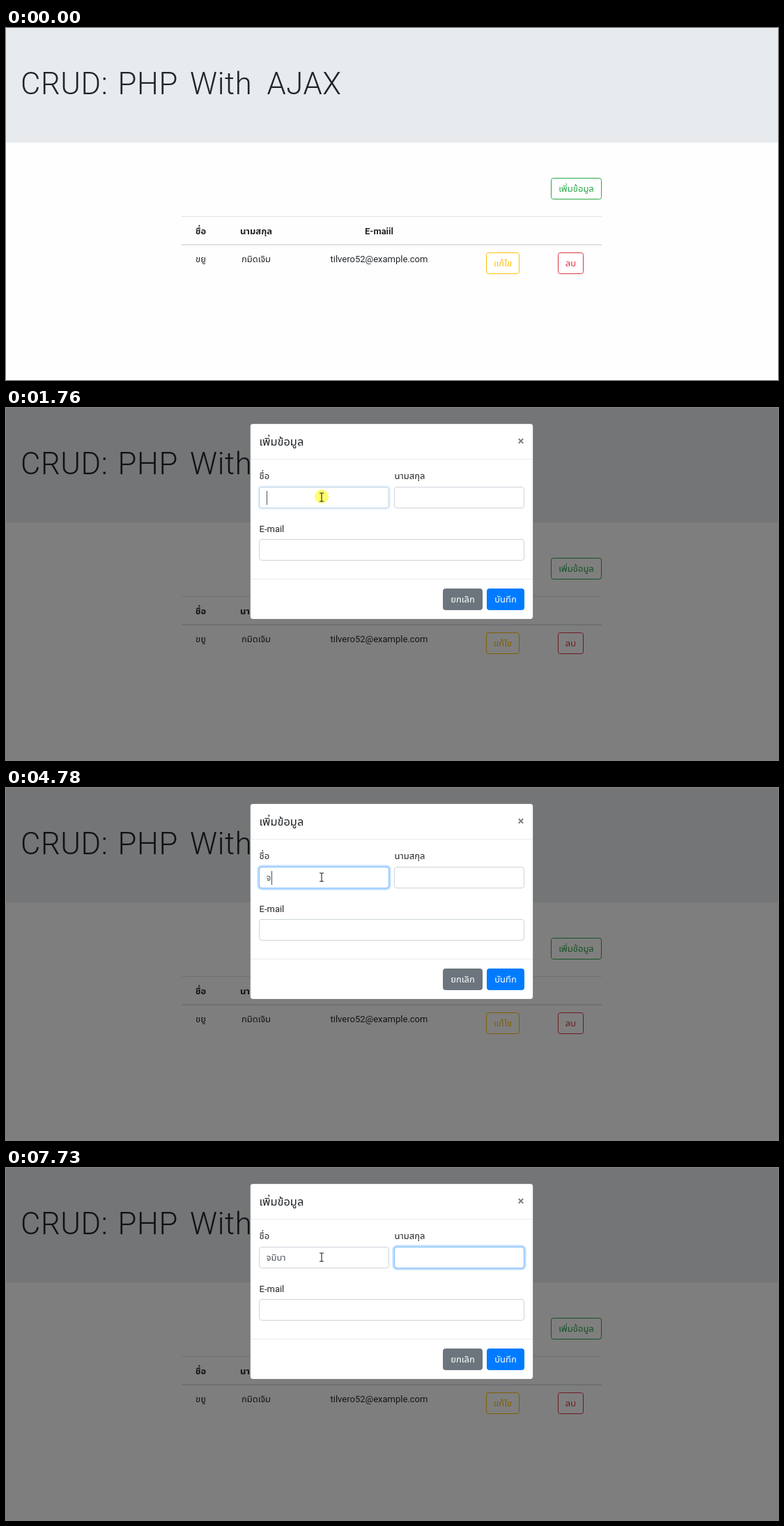
These frames come from a looping animation (1108x505 px, 8 s). An HTML page:

```html
<!DOCTYPE html>
<html lang="th">
<head>
<meta charset="utf-8">
<title>CRUD: PHP With AJAX</title>
<style>
  html, body { margin: 0; width: 100%; height: 100%; overflow: hidden; background: #fff; }
  svg { display: block; width: 100vw; height: 100vh; }
  text { font: 400 13px Roboto, "Noto Sans Thai", "Noto Sans", sans-serif; fill: #212529; white-space: pre; }
</style>
</head>
<body>
<svg id="stage" viewBox="0 0 1108 505" xmlns="http://www.w3.org/2000/svg"></svg>
<script>
const LOOP = 8000;
const stage = document.getElementById('stage');

function el(parent, tag, attrs = {}, content) {
  const node = document.createElementNS('http://www.w3.org/2000/svg', tag);
  for (const key in attrs) node.setAttribute(key, attrs[key]);
  if (content) node.textContent = content;
  return parent.appendChild(node);
}
const group = (parent, attrs) => el(parent, 'g', attrs);
const rect = (parent, x, y, width, height, fill, attrs) =>
  el(parent, 'rect', { x, y, width, height, fill, ...attrs });
const label = (parent, x, y, str, style = '', anchor = 'start') =>
  el(parent, 'text', { x, y, style, 'text-anchor': anchor }, str);

function button(parent, x, y, w, str, color, solid) {
  const box = rect(parent, x + .5, y + .5, w - 1, 30, solid ? color : '#fff', { rx: 3, stroke: color });
  const text = label(parent, x + w / 2, y + 20, str,
    `fill:${solid ? '#fff' : color};font-weight:${solid ? 500 : 400}`, 'middle');
  return { box, text };
}

function field(parent, x, y, w) {
  const glow = rect(parent, x - 1, y - 1, w + 2, 33, 'none',
    { rx: 5, stroke: '#007bff', 'stroke-opacity': .25, 'stroke-width': 3 });
  rect(parent, x + .5, y + .5, w - 1, 30, '#fff', { rx: 3.5, stroke: '#ced4da' });
  const edge = rect(parent, x + .5, y + .5, w - 1, 30, 'none', { rx: 3.5, stroke: '#80bdff' });
  return focus => [glow, edge].forEach(n => n.setAttribute('opacity', focus));
}

// Page
rect(stage, 0, 0, 1108, 505, '#fefefe');
rect(stage, 0, 0, 1108, 164.5, '#e7ebee');
[['CRUD:', 21], ['PHP', 160.5], ['With', 264], ['AJAX', 374.5]].forEach(([word, x]) =>
  label(stage, x, 95, word, 'font-size:43.6px;font-weight:300;letter-spacing:.6px'));

const addButton = button(stage, 782, 215, 73, 'เพิ่มข้อมูล', '#28a745');
rect(stage, 252, 270, 603, 1, '#dee2e6');
rect(stage, 252, 310, 603, 2, '#dee2e6');
const columns = [279.5, 359, 535.5];
['ชื่อ', 'นามสกุล', 'E-maiil'].forEach((s, i) =>
  label(stage, columns[i], 296, s, 'font-weight:700', 'middle'));
['ขยู', 'กมิดเจิม', 'tilvero52@example.com'].forEach((s, i) =>
  label(stage, columns[i], 336, s, '', 'middle'));
button(stage, 689, 322, 48, 'แก้ไข', '#ffc107');
button(stage, 792, 322, 37, 'ลบ', '#dc3545');

// Modal
const modal = group(stage);
rect(modal, 0, 0, 1108, 505, '#000', { opacity: .5 });
rect(modal, 350.5, 22.5, 406, 280.5, '#fff', { rx: 4, stroke: '#000', 'stroke-opacity': .25 });
rect(modal, 351, 73, 405, 1, '#e9ecef');
rect(modal, 351, 245, 405, 1, '#e9ecef');
label(modal, 363.5, 54, 'เพิ่มข้อมูล', 'font-size:16.4px;font-weight:500');
label(modal, 739, 53, '×', 'font-size:17px;font-weight:700;fill:#7f7f7f', 'middle');
label(modal, 363.5, 102, 'ชื่อ');
label(modal, 557.5, 102, 'นามสกุล');
label(modal, 363.5, 178, 'E-mail');
const focusFirst = field(modal, 363, 113, 187);
const focusLast = field(modal, 557, 113, 187);
field(modal, 363, 188, 381)(0);
button(modal, 627, 259, 57, 'ยกเลิก', '#6c757d', true);
button(modal, 690, 259, 54, 'บันทึก', '#007bff', true);
const typed = label(modal, 373.5, 133, '', 'fill:#495057');
const caret = rect(modal, 374, 119, 1, 20, '#495057');

// Autofill list
const list = group(modal);
rect(list, 362.5, 145, 188, 78, '#000', { rx: 2, opacity: .1 });
rect(list, 363, 145, 187, 76.5, '#fff', { stroke: '#000', 'stroke-opacity': .15 });
rect(list, 363.5, 187.5, 186, 33.5, '#f8f9fa');
rect(list, 363.5, 187, 186, 1, '#e4e6e8');
label(list, 373, 171, 'ขยู', 'font-size:10px');
label(list, 540, 171, 'ขยู กมิดเจิม', 'font-size:10px;fill:#6b6e72', 'end');
label(list, 373, 208, 'จัดการ...', 'font-size:10px;fill:#55585c');

// Pointer
const pointer = group(stage);
const click = el(pointer, 'circle', { r: 10, cy: -1, fill: '#ff0', opacity: .55 });
const outline = { fill: '#fff', stroke: '#111', 'stroke-width': 1, 'stroke-linejoin': 'round' };
const shapes = {
  arrow: el(pointer, 'path', { ...outline, d: 'M0 0V13.5L3 10.8L5 15.6L7.4 14.6L5.3 10H9.4Z' }),
  hand: el(pointer, 'path', { ...outline,
    d: 'M-.5 10V1Q.7-.8 1.9 1V6.5Q3.2 5.6 4.2 7Q5.6 6.2 6.4 7.6Q8.6 7 8.6 9.4V13L7 17.5H0L-4 11.5Q-4.2 9.3-2.5 9.8Z' }),
  beam: el(pointer, 'path', { fill: 'none', stroke: '#222', 'stroke-width': 1.1,
    d: 'M-3-6H-1Q0-6 0-5Q0-6 1-6H3M0-5V5M-3 6H-1Q0 6 0 5Q0 6 1 6H3' })
};

// [time, text]
const typing = [[0, ''], [3610, ';'], [4310, ''], [4780, 'จ'], [5620, 'จม'],
  [5940, 'จมิ'], [6420, 'จมิบ'], [6550, 'จมิบา']];
// Times at which the caret toggles, starting hidden
const blinks = [1760, 2290, 2840, 3380, 3610, 4140, 4710, 5310, 5620, 7100, 7200, 7730];

const clamp = v => Math.min(1, Math.max(0, v));
const smooth = v => v * v * (3 - 2 * v);
const ramp = (t, from, length) => clamp((t - from) / length);
const during = (t, a, b) => t >= a && t < b;
const show = (node, on) => node.setAttribute('display', on ? 'inline' : 'none');
const inside = (p, x, y, w, h) => p.x >= x && p.x <= x + w && p.y >= y && p.y <= y + h;

const START = { x: 886, y: 390 }, ADD = { x: 806, y: 232 }, NAME = { x: 453, y: 128 };

function pointerAt(t) {
  const toAdd = t < 970;
  const [a, b] = toAdd ? [START, ADD] : [ADD, NAME];
  const step = toAdd ? Math.floor((t - 70) / 70) / 5 : (Math.floor((t - 1050) / 76.25) + 1) / 9;
  const k = smooth(clamp(step));
  return { x: a.x + (b.x - a.x) * k, y: a.y + (b.y - a.y) * k };
}

function draw(t) {
  const open = t >= 970;
  const p = pointerAt(t);

  const hover = ramp(t, 280, 140) * (1 - ramp(t, 1050, 150));
  const mix = (a, b) => Math.round(a + (b - a) * hover);
  addButton.box.setAttribute('fill', `rgb(${mix(255, 40)},${mix(255, 167)},${mix(255, 69)})`);
  addButton.text.style.fill = `rgb(${mix(40, 255)},${mix(167, 255)},${mix(69, 255)})`;

  show(modal, open);
  show(list, during(t, 1830, 4310));
  const leave = ramp(t, 7180, 150);
  focusFirst(ramp(t, 1720, 150) * (1 - leave));
  focusLast(leave);

  const text = typing.filter(([at]) => t >= at).pop()[1];
  if (typed.textContent !== text) typed.textContent = text;
  show(caret, blinks.filter(at => t >= at).length % 2);
  const caretX = t >= 7200 ? 568 : 374 + (text && open ? typed.getComputedTextLength() : 0);
  caret.setAttribute('x', Math.round(caretX));

  let kind = 'arrow';
  if (!open && inside(p, 782, 215, 73, 31)) kind = 'hand';
  if (open && (inside(p, 363, 113, 187, 31) || inside(p, 557, 113, 187, 31) || inside(p, 363, 188, 381, 31))) kind = 'beam';
  for (const name in shapes) show(shapes[name], name === kind);
  show(click, during(t, 910, 970) || during(t, 1760, 1830));
  show(pointer, t >= 70);
  pointer.setAttribute('transform', `translate(${p.x.toFixed(1)} ${p.y.toFixed(1)})`);
}

const origin = performance.now();
function tick() {
  draw((performance.now() - origin) % LOOP);
  requestAnimationFrame(tick);
}
draw(0);
requestAnimationFrame(tick);
</script>
</body>
</html>
```
